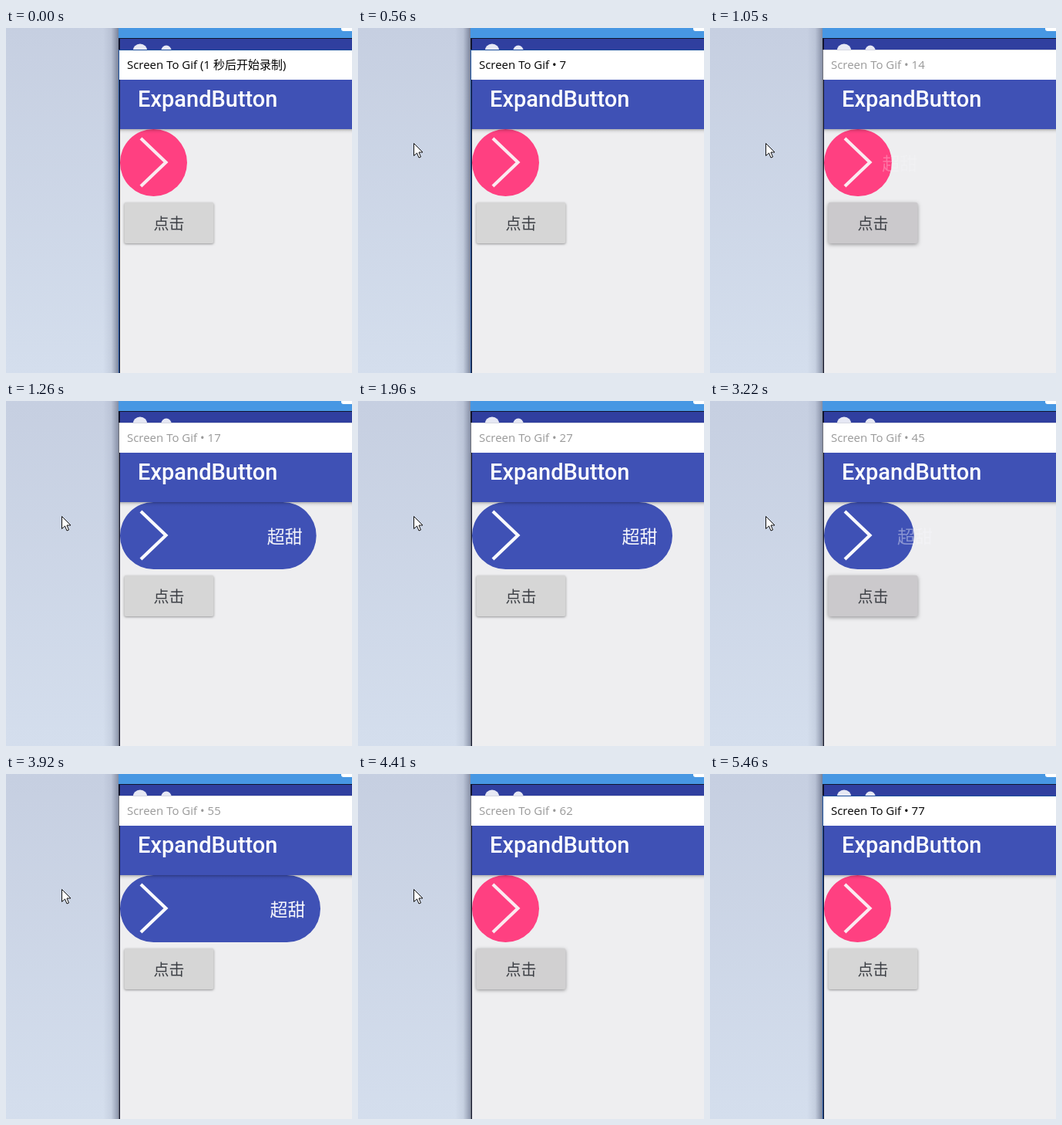
An HTML page with a canvas that plays this animation: 449 by 447 pixels, repeating every 5530 ms.

```html
<!DOCTYPE html>
<html lang="zh">
<head>
<meta charset="utf-8">
<title>ExpandButton</title>
<style>
html, body { margin: 0; width: 100%; height: 100%; overflow: hidden; background: #cdd6e6; }
canvas { display: block; }
</style>
</head>
<body>
<canvas id="stage" width="449" height="447"></canvas>
<script>
const W = 449, H = 447, LOOP = 5530, STEP = 70;
const ctx = document.getElementById('stage').getContext('2d');
const PINK = '#ff4081', BLUE = '#3f51b5';
const UI = '"Open Sans", "Noto Sans CJK SC", sans-serif';
const CJK = '"Noto Sans CJK SC", "Noto Sans CJK", sans-serif';

const FOCUS_LOST = 700, FOCUS_BACK = 5250;
const SLIDE = 250;
const SLIDES = [[1038, 1], [2057, 0], [3152, 1], [4130, 0]];   // start, target
const PRESSES = [[910, 1060], [1960, 2130], [3080, 3230], [4060, 4375]];
const CURSOR = [[140, 359, 316], [350, 150, 230], [490, 26, 160], [560, 72, 149], [4900, 72, 149]];

const clamp = v => Math.max(0, Math.min(1, v));
const lerp = (a, b, p) => a + (b - a) * p;
const ease = p => (1 - Math.cos(Math.PI * p)) / 2;

function rect(x, y, w, h, fill) {
  ctx.fillStyle = fill;
  ctx.fillRect(x, y, w, h);
}

function rounded(x, y, w, h, r, fill) {
  ctx.fillStyle = fill;
  ctx.beginPath();
  ctx.roundRect(x, y, w, h, r);
  ctx.fill();
}

function text(str, x, y, font, fill) {
  ctx.font = font;
  ctx.fillStyle = fill;
  ctx.fillText(str, x, y);
}

function fade(x0, y0, x1, y1, ...colors) {
  const g = ctx.createLinearGradient(x0, y0, x1, y1);
  colors.forEach((c, i) => g.addColorStop(i / (colors.length - 1), c));
  return g;
}

function line(points, width, color) {
  ctx.beginPath();
  points.forEach(([x, y]) => ctx.lineTo(x, y));
  ctx.lineWidth = width;
  ctx.strokeStyle = color;
  ctx.stroke();
}

function expansion(t) {
  let v = 0;
  for (const [start, target] of SLIDES) {
    if (t >= start) v = lerp(1 - target, target, ease(clamp((t - start) / SLIDE)));
  }
  return v;
}

function pressLevel(t) {
  return Math.max(...PRESSES.map(([down, up]) =>
    clamp((t - down) / 70) * clamp(1 - (t - up) / 70)));
}

function cursorAt(t) {
  for (let i = 1; i < CURSOR.length; i++) {
    const [t0, x0, y0] = CURSOR[i - 1], [t1, x1, y1] = CURSOR[i];
    if (t >= t0 && t <= t1) {
      const p = (t - t0) / (t1 - t0);
      return [Math.round(lerp(x0, x1, p)), Math.round(lerp(y0, y1, p))];
    }
  }
  return null;
}

function drawDesktop(active) {
  rect(0, 0, W, H, fade(0, 0, 0, H, '#c6cfe1', '#d4deed'));
  const shade = active ? 0.36 : 0.3;
  rect(126, 0, 21, H, fade(126, 0, 147, 0,
    'rgba(70,80,110,0)', `rgba(70,80,110,${shade * 0.3})`, `rgba(60,68,95,${shade * 1.7})`));
}

function drawPhone() {
  rect(146, 0, W - 146, 13, '#4797e3');
  rounded(435, -6, 20, 10, 3, '#fff');
  rect(146, 13, W - 146, H - 13, '#10142c');
  rect(148, 14, W - 148, 15, '#303f9f');
  ctx.fillStyle = '#e6e8f4';
  for (const [x, y, r] of [[174, 30, 9.5], [208, 29, 6.5]]) {
    ctx.beginPath();
    ctx.arc(x, y, r, 0, 7);
    ctx.fill();
  }
  rect(148, 67, W - 148, 64, BLUE);
  rect(148, 131, W - 148, H - 131, '#eeeef0');
}

function drawPill(v) {
  const right = lerp(235, 408, v);
  rounded(148, 131, right - 148, 87, 43.5, v < 0.05 ? PINK : BLUE);
  line([[175, 143], [207.5, 174], [175, 205]], 4.2, v < 0.05 ? '#fbeaf0' : '#fafafd');
  if (v > 0) {
    ctx.globalAlpha = lerp(0.28, 1, v);
    text('超甜', lerp(222.5, 342.5, v), 183.5, '500 23px ' + CJK, '#f8f8fc');
    ctx.globalAlpha = 1;
  }
  rect(148, 131, W - 148, 6, fade(0, 131, 0, 137, 'rgba(0,0,0,.26)', 'rgba(0,0,0,.06)', 'rgba(0,0,0,0)'));
}

function drawButton(level) {
  const tone = i => Math.round(lerp([214, 214, 214][i], [203, 201, 204][i], level));
  ctx.save();
  ctx.shadowColor = 'rgba(0,0,0,.38)';
  ctx.shadowBlur = lerp(3, 5, level);
  ctx.shadowOffsetY = lerp(1, 1.6, level);
  rounded(153.5, 226, 116, 53, 2.5, `rgb(${tone(0)},${tone(1)},${tone(2)})`);
  ctx.restore();
  text('点击', 191.5, 260.5, '500 20px ' + CJK, '#3c3f45');
}

function drawRecorder(k, active) {
  rect(147, 28, W - 147, 39, '#fff');
  const edge = active ? '#1b4f9c' : '#6d7079';
  rect(147, 28, W - 147, 1, active ? edge : '#d6d8e2');
  rect(146, 28, 1, H - 28, edge);
  const label = k ? '• ' + (k - 1) : '(1 秒后开始录制)';
  text('Screen To Gif ' + label, 157, 53, '15px ' + UI, active ? '#000' : '#999');
  text('ExpandButton', 171, 102, '500 29px Roboto, sans-serif', '#fff');
}

function drawCursor([x, y]) {
  ctx.beginPath();
  for (const [dx, dy] of [[0, 0], [0, 16], [4, 12.5], [6.5, 18.5], [9, 17.5], [6.5, 11.5], [11.5, 11.5]]) {
    ctx.lineTo(x + 0.5 + dx, y + 0.5 + dy);
  }
  ctx.closePath();
  ctx.fillStyle = '#fff';
  ctx.fill();
  ctx.lineWidth = 1;
  ctx.strokeStyle = '#111';
  ctx.stroke();
}

function draw(k) {
  const t = k * STEP;
  const active = t < FOCUS_LOST || t >= FOCUS_BACK;
  drawDesktop(active);
  drawPhone();
  drawPill(expansion(t));
  drawButton(pressLevel(t));
  drawRecorder(k, active);
  const pos = cursorAt(t);
  if (pos) drawCursor(pos);
}

const begin = performance.now();
function tick() {
  const t = (performance.now() - begin) % LOOP;
  draw(Math.floor(t / STEP));
  requestAnimationFrame(tick);
}
tick();
</script>
</body>
</html>
```
